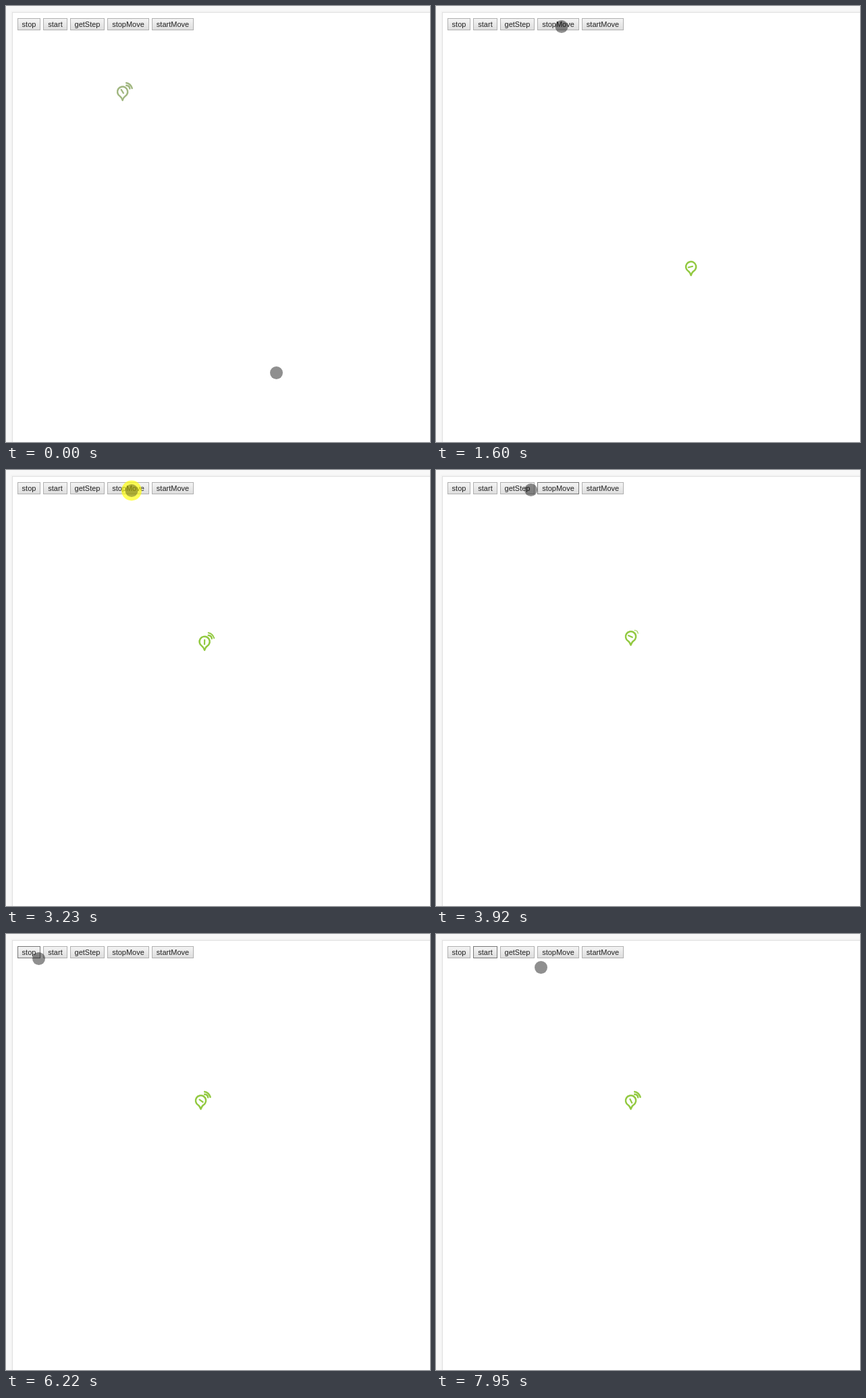
An HTML page with a canvas that plays this animation: 628x646 px, repeating every 8 s.

```html
<!DOCTYPE html>
<html lang="en">
<head>
<meta charset="utf-8">
<title>Moving marker</title>
<style>
  html, body { margin: 0; width: 100%; height: 100%; overflow: hidden; background: #fff; }
  canvas { display: block; }
</style>
</head>
<body>
<canvas id="stage" width="628" height="646"></canvas>
<script>
const ctx = document.getElementById('stage').getContext('2d');
const LOOP = 8000;
const TURN = 2080, MOVE_END = 3275;     // the marker turns back, then stops on its way
const ICON_STOP = 5480, ICON_START = 7480;
const WAVE_PERIOD = 2850;

const buttons = [
  { label: 'stop', width: 34 }, { label: 'start', width: 36 },
  { label: 'getStep', width: 51 }, { label: 'stopMove', width: 62 },
  { label: 'startMove', width: 62 }
];
const clicks = [
  { label: 'stopMove', from: 3150, to: 3360 },
  { label: 'stop', from: 5400, to: 5560 },
  { label: 'start', from: 7390, to: 7530 }
];
// The pointer rests between these moves.
const moves = [
  { from: 70, to: 780, x: 30, y: 62 },
  { from: 830, to: 980, x: 44.5, y: 39.5 },
  { from: 980, to: 1600, x: 186, y: 30.5 },
  { from: 3440, to: 4800, x: 57.5, y: 27.5 },
  { from: 4800, to: 5200, x: 33.5, y: 31 },
  { from: 6020, to: 6220, x: 48.5, y: 36.5 },
  { from: 6220, to: 6780, x: 80, y: 29 },
  { from: 7520, to: 7950, x: 155.5, y: 49.5 }
];

const clamp01 = x => Math.min(1, Math.max(0, x));
const ramp = (t, from, to) => clamp01((t - from) / (to - from));
const bezier = (u, a, b, c) => (1 - u) ** 2 * a + 2 * u * (1 - u) * b + u * u * c;

function disc(x, y, radius, color) {
  ctx.fillStyle = color;
  ctx.beginPath();
  ctx.arc(x, y, radius, 0, Math.PI * 2);
  ctx.fill();
}

function drawPage() {
  ctx.fillStyle = '#f8f8f8';
  ctx.fillRect(0, 0, 628, 646);
  ctx.fillStyle = '#f4f4f4';
  ctx.fillRect(7, 7, 621, 639);
  ctx.fillStyle = '#e0e0e0';
  ctx.fillRect(9, 9, 619, 637);
  ctx.fillStyle = '#fff';
  ctx.fillRect(10, 10, 618, 636);
}

function drawButtons(t) {
  const focus = clicks.filter(click => t >= click.to).pop();
  const face = ctx.createLinearGradient(0, 18, 0, 36);
  face.addColorStop(0, '#f5f5f5');
  face.addColorStop(1, '#ddd');
  ctx.font = '11px "Liberation Sans", Arial, sans-serif';
  ctx.textAlign = 'center';
  ctx.lineWidth = 1;
  let x = 17;
  for (const { label, width } of buttons) {
    ctx.fillStyle = face;
    ctx.fillRect(x, 18, width, 18);
    ctx.strokeStyle = focus && focus.label === label ? '#777' : '#b0b0b0';
    ctx.strokeRect(x + .5, 18.5, width - 1, 17);
    ctx.fillStyle = '#222';
    ctx.fillText(label, x + width / 2, 31);
    x += width + 4;
  }
}

function drawPin() {
  ctx.lineWidth = 2.5;
  ctx.beginPath();
  ctx.arc(0, 0, 7.6, Math.PI * .68, Math.PI * 2.32);
  ctx.quadraticCurveTo(1.6, 8, 0, 12.6);
  ctx.quadraticCurveTo(-1.6, 8, -4.1, 6.4);
  ctx.closePath();
  ctx.stroke();
}

// The hand turns clockwise and gradually slows down.
function drawHand(t) {
  const degrees = -32 + .18 * t - 160 * (t / 5910) ** 5;
  ctx.save();
  ctx.rotate(degrees * Math.PI / 180);
  ctx.lineWidth = 2.2;
  ctx.beginPath();
  ctx.moveTo(0, 2.4);
  ctx.lineTo(0, -3.8);
  ctx.stroke();
  ctx.restore();
}

function drawWave(strength, size) {
  if (!strength) return;
  ctx.lineWidth = 2.5 * strength;
  ctx.beginPath();
  ctx.moveTo(5.6, -5 - 4 * size);
  ctx.quadraticCurveTo(8 + 2 * size, -6.2 - 2.8 * size, 6.5 + 3.8 * size, -4 - .6 * size);
  ctx.stroke();
}

function drawMarker(t) {
  const u = 1 - Math.abs(Math.min(t, MOVE_END) - TURN) / TURN;
  const iconTime = Math.min(t, ICON_STOP) + Math.max(0, t - ICON_START);
  const phase = iconTime % WAVE_PERIOD;

  ctx.save();
  ctx.translate(bezier(u, 172.5, 312.6, 435), bezier(u, 127, 233.6, 501));
  ctx.strokeStyle = `hsl(84, ${28 + 28 * ramp(t, 0, 900)}%, ${61 - 9 * ramp(t, 0, 900)}%)`;
  ctx.lineCap = ctx.lineJoin = 'round';
  drawPin();
  drawHand(iconTime);
  // The inner wave appears first and lasts longer.
  drawWave(ramp(phase, 2320, 2500) + ramp(phase, 1500, 500) * (phase < 1500), 1.1);
  drawWave(ramp(phase, 2420, 2600) + ramp(phase, 800, 250) * (phase < 800), 2);
  ctx.restore();
}

function drawPointer(t) {
  let x = 400.5, y = 543.5;
  for (const move of moves) {
    const k = ramp(t, move.from, move.to);
    x += (move.x - x) * k;
    y += (move.y - y) * k;
  }
  const pressed = clicks.some(click => t >= click.from && t < click.to);
  if (pressed) disc(x, y, 15, 'rgba(255,255,0,.65)');
  disc(x, y, 9.5, `rgba(0,0,0,${pressed ? .3 : .44})`);
}

function frame(now) {
  const t = now % LOOP;
  drawPage();
  drawButtons(t);
  drawMarker(t);
  drawPointer(t);
  requestAnimationFrame(frame);
}
frame(0);
</script>
</body>
</html>
```
